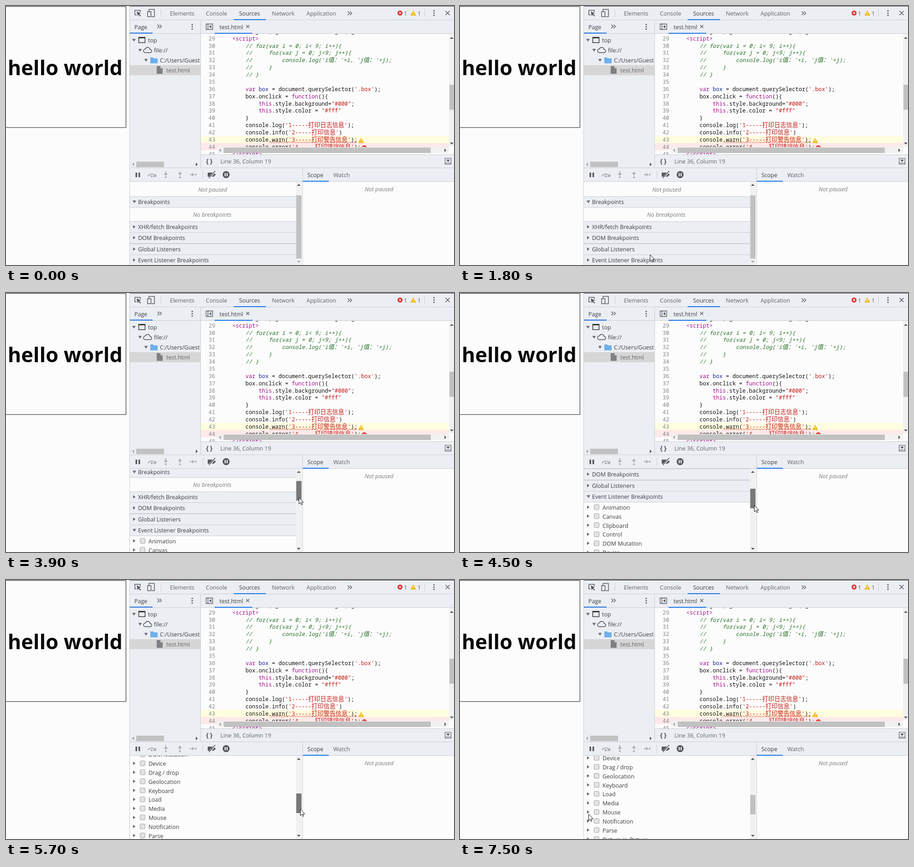
These frames come from a looping animation (984 by 569 pixels, 8000 ms). An HTML page:

```html
<!DOCTYPE html>
<html lang="en">
<head>
<meta charset="utf-8">
<title>Debugger panel</title>
<style>
  html, body { margin: 0; width: 100%; height: 100%; overflow: hidden; background: #fcfcfc; }
  svg { display: block; }
  text { font: 12.5px "Open Sans", "Noto Sans", sans-serif; fill: #3a3d42; white-space: pre; }
  .tab { fill: #5f6368; }
  .note { font-style: italic; fill: #7b7e82; text-anchor: middle; }
  .title { font-size: 45px; font-weight: 700; fill: #0a0a0a; }
  .code { font: 12.1px "Noto Sans Mono", "DejaVu Sans Mono", monospace; fill: #111; }
  .num { fill: #85888c; text-anchor: end; }
  .brace { font-size: 15px; font-weight: 600; fill: #55585c; }
  .cjk { font-family: "Noto Sans CJK SC", "Noto Sans CJK", sans-serif; font-size: 13.2px; }
  .com { fill: #236e25; font-style: italic; }
  .key { fill: #a3128c; }
  .str { fill: #c41a16; }
  .def { fill: #1c2b9c; }
</style>
</head>
<body>
<svg id="stage" width="984" height="569" viewBox="0 0 984 569"></svg>
<script>
const BAR = '#ebeef3', PAGE = '#fcfcfc', EDGE = '#cbcdd1', BLUE = '#1a73e8', ICON = '#55585c', DIM = '#a9abb0';

const esc = s => s.replace(/&/g, '&amp;').replace(/</g, '&lt;');
const rect = (x, y, w, h, fill, more = '') =>
  `<rect x="${x}" y="${y}" width="${w}" height="${h}" fill="${fill}" ${more}/>`;
const path = (d, fill, more = '') => `<path d="${d}" fill="${fill}" ${more}/>`;
const line = (d, color = ICON, w = 1.5) => path(d, 'none', `stroke="${color}" stroke-width="${w}"`);
const dot = (x, y, r, fill) => `<circle cx="${x}" cy="${y}" r="${r}" fill="${fill}"/>`;
const label = (x, cy, s, cls = '') => `<text x="${x}" y="${cy + 4.5}" class="${cls}">${esc(s)}</text>`;
const clip = (id, x, y, w, h) => `<clipPath id="${id}">${rect(x, y, w, h, '#000')}</clipPath>`;

const right = (x, y, c = '#6b6e72') => path(`M${x} ${y - 3.7}l5.5 3.7l-5.5 3.7z`, c);
const down = (x, y, c = '#6b6e72') => path(`M${x - 4} ${y - 2.7}h8l-4 6z`, c);
const cross = (x, y, r, c = ICON, w = 1.5) =>
  line(`M${x - r} ${y - r}l${2 * r} ${2 * r}m0 ${-2 * r}l${-2 * r} ${2 * r}`, c, w);
const kebab = (x, y) => [-5, 0, 5].map(d => dot(x, y + d, 1.6, ICON)).join('');
const more = (x, y) => line(`M${x - 4.5} ${y - 4}l4 4l-4 4m5 -8l4 4l-4 4`, ICON, 1.4);
// Scrollbar arrow: tip direction (dx, dy)
const tip = (x, y, dx, dy, c = '#505050') =>
  path(`M${x + dx * 2} ${y + dy * 2}L${x - dx * 2 - dy * 4} ${y - dy * 2 - dx * 4}L${x - dx * 2 + dy * 4} ${y - dy * 2 + dx * 4}z`, c);
const warn = (x, y) =>
  path(`M${x} ${y - 5}l5.5 10h-11z`, '#f2b70f', 'stroke="#f2b70f" stroke-linejoin="round"') +
  line(`M${x} ${y - 2}v3.6m0 1v1.6`, '#fff', 1.4);
const error = (x, y) => dot(x, y, 5.5, '#e0342d') + cross(x, y, 2, '#fff', 1.3);

// ---- Page under test
const page = () =>
  rect(0, 0, 984, 569, PAGE) +
  line('M0 1H263.5V267H0', '#111', 1) +
  `<text class="title" x="3.7" y="152">hello world</text>`;

// ---- Main toolbar
const toolbar = () => {
  const tabs = [[360, 'Elements'], [439, 'Console'], [512, 'Sources'], [584, 'Network'], [660, 'Application']];
  return rect(271, 0, 713, 30, BAR) + rect(271, 0, 713, 1, '#3c3c3c') + rect(271, 30, 713, 1, EDGE) +
    line('M287 19.5h-4v-10h12v4') + path('M287 12l9.5 4l-4 1.5l4 4l-1.5 1.5l-4 -4l-1.5 3.5z', ICON) +
    line('M314 12V7.5h12v16h-6M311 12.5h7.5v11h-7.5z') +
    rect(340, 7, 1, 17, EDGE) +
    tabs.map(([x, s]) => label(x, 16, s, s === 'Sources' ? '' : 'tab')).join('') +
    rect(500, 29, 71, 2, BLUE) + more(755, 16) +
    error(865.5, 15.5) + label(874, 16, '1', 'tab') + warn(894.5, 15.5) + label(904, 16, '1', 'tab') +
    rect(919, 7, 1, 17, EDGE) + kebab(940, 15.5) + cross(970, 15.5, 4.5);
};

// ---- File tree
const tree = () =>
  rect(271, 31, 156, 324, BAR) + rect(271, 60, 156, 1, EDGE) +
  label(282, 46, 'Page') + rect(271, 58.5, 51, 2, BLUE) + more(337, 45) + kebab(409, 45.5) +
  rect(271, 130, 156, 22, '#d6d6d6') +
  down(281, 75) + line('M291.5 69h14v11.5h-14z', '#333') + rect(291, 68, 15, 3, '#333') + label(312, 75, 'top') +
  down(294.5, 97) +
  line('M306 102.5h10.5a3.5 3.5 0 0 0 0 -7a5.5 5.5 0 0 0 -10.5 -1a4 4 0 0 0 0 8z', '#44474b') +
  label(325, 97, 'file://') +
  down(307.5, 119) + path('M317 113h6l2 2h8v11h-16z', '#6db0ee') +
  `<g clip-path="url(#nav)">${label(338, 119, 'C:/Users/Guest')}</g>` +
  path('M331 132h8l5 5v12h-13z', '#7f8083') + path('M339 132v5h5z', '#c9cacc') +
  label(352, 141, 'test.html', 'tab') +
  rect(286, 342, 61, 12, '#c1c1c1') + tip(279, 348, -1, 0, '#a0a0a0') + tip(419, 348, 1, 0) +
  rect(427, 31, 1, 324, EDGE);

// ---- Code editor
const PITCH = 15.87, CELL = 7.26, FIRST = 29;
const source = [
  '    <script>',
  '        // for(var i = 0; i< 9; i++){',
  '        //     for(var j = 0; j<9; j++){',
  "        //         console.log('i值：'+i, 'j值：'+j);",
  '        //     }',
  '        // }',
  '',
  "        var box = document.querySelector('.box');",
  '        box.onclick = function(){',
  '            this.style.background="#000";',
  '            this.style.color = "#fff"',
  '        }',
  "        console.log('1-----打印日志信息');",
  "        console.info('2-----打印信息')",
  "        console.warn('3-----打印警告信息');",
  "        console.error('4-----打印错误信息');",
  '    <\/script>'
];
const span = (cls, s) => `<tspan class="${cls}">${s}</tspan>`;
const wide = s => esc(s).replace(/[\u3000-\uffef]+/g, m => span('cjk', m));
const tint = s => {
  if (s.startsWith('//')) return span('com', wide(s));
  return s.split(/('[^']*'|"[^"]*"|\bvar\b|\bthis\b|\bfunction\b|<\/?script>|box(?= =))/).map((part, i) => {
    if (i % 2 === 0) return wide(part);
    const cls = /^['"]/.test(part) ? 'str' : part === 'box' ? 'def' : 'key';
    return span(cls, wide(part));
  }).join('');
};
const codeLine = (s, i) => {
  const y = 75.7 + i * PITCH, indent = s.search(/\S|$/);
  return `<text class="code num" x="459.5" y="${y}">${FIRST + i}</text>` +
    `<text class="code" x="${467.9 + indent * CELL}" y="${y}">${tint(s.trim())}</text>`;
};
const wave = (x, y, n) => line(`M${x} ${y}` + 'q1.5 -3 3 0t3 0'.repeat(n), '#d8372f', 1);

const editor = () =>
  rect(428, 31, 556, 29, BAR) + rect(428, 60, 556, 1, EDGE) +
  line('M439.5 39.5h14.5v12h-14.5zM443.5 39.5v12', ICON, 1.3) + path('M451 42v7l-5 -3.5z', ICON) +
  label(469, 46, 'test.html') + cross(531, 45, 3.3, ICON, 1.3) + rect(458, 59, 83, 2, BLUE) +
  `<g clip-path="url(#code)">` +
    rect(428, 285, 545, 16, '#fffde0') + rect(428, 301, 545, 16, '#fde9e9') +
    `<text class="code" x="526" y="59.8">   g   , g                 g  , g</text>` +
    source.map(codeLine).join('') +
    wave(578, 299.5, 32) + warn(780, 295.5) + error(787, 311.5) +
  `</g>` +
  rect(464, 310, 509, 13, '#f1f1f1') + rect(478, 311, 455, 12, '#c1c1c1') +
  tip(470, 317, -1, 0, '#a0a0a0') + tip(965, 317, 1, 0) +
  rect(973, 61, 11, 247, '#f1f1f1') + rect(974, 173, 10, 55, '#c1c1c1') +
  tip(979, 70, 0, -1) + tip(979, 302, 0, 1) +
  rect(428, 326, 556, 29, BAR) + rect(428, 326, 556, 1, EDGE) +
  `<text class="code brace" x="437.5" y="345.5">{}</text>` +
  label(471, 341, 'Line 36, Column 19', 'tab') +
  line('M964.5 334.5h13v13h-13zM964 345h14', ICON, 1.1) + path('M967 337.5h8l-4 5z', ICON);

// ---- Debugger bar and scope
const debugBar = () =>
  rect(271, 355, 713, 31, BAR) + rect(271, 355, 713, 1, EDGE) + rect(271, 385, 713, 1, EDGE) +
  rect(284.5, 366, 3.5, 10, ICON) + rect(291, 366, 3.5, 10, ICON) +
  line('M312 374a8.5 7 0 0 1 15.5 -1', DIM, 2) + path('M330 368v7.5h-7.5z', DIM) + dot(320, 374, 2.2, DIM) +
  line('M351 363v6', DIM, 2) + path('M346.5 368h9l-4.5 5z', DIM) + dot(351, 376, 2, DIM) +
  line('M382 373v-6', DIM, 2) + path('M377.5 369h9l-4.5 -5z', DIM) + dot(382, 376.5, 2, DIM) +
  line('M404 370.5h7', DIM, 2) + path('M409 366.5v8l4.5 -4z', DIM) + dot(416.5, 370.5, 2, DIM) +
  rect(432, 362, 1, 18, EDGE) +
  path('M443 366h13l5 4.5l-5 4.5h-13z', ICON) + line('M446 378.5l14 -16', BAR, 4) + line('M445.5 378l14 -15.5', ICON, 1.8) +
  dot(483.5, 370.5, 7.7, ICON) + rect(480.3, 367, 2.2, 7, '#fff') + rect(484.6, 367, 2.2, 7, '#fff') +
  label(662, 371, 'Scope') + label(719, 371, 'Watch', 'tab') + rect(652, 384, 57, 2, BLUE) +
  label(819.5, 402, 'Not paused', 'note') + rect(651, 356, 1, 213, EDGE);

// ---- Breakpoint sections: top edge in the unscrolled list, title
const sections = [[418, 'Breakpoints'], [473, 'XHR/fetch Breakpoints'], [497, 'DOM Breakpoints'],
  [522, 'Global Listeners'], [546, 'Event Listener Breakpoints']];
const events = ['Animation', 'Canvas', 'Clipboard', 'Control', 'DOM Mutation', 'Device', 'Drag / drop',
  'Geolocation', 'Keyboard', 'Load', 'Media', 'Mouse', 'Notification', 'Parse', 'Picture-in-Picture'];

const section = ([top, s], i) => {
  const y = top + 12;
  const mark = i === 0 ? down(282, y) : i < 4 ? right(279, y) :
    `<g id="shut">${right(279, y)}</g><g id="open">${down(282, y)}</g>`;
  return rect(271, top, 366, 24, BAR) + rect(271, top, 366, 1, EDGE) + rect(271, top + 24, 366, 1, EDGE) +
    mark + label(290, y, s);
};
const eventRow = (s, i) => {
  const y = 582.5 + i * 19.83;
  return right(279, y - 1) +
    rect(294.5, y - 6.5, 11, 11, '#e3e3e3', 'rx="2" stroke="#a2a2a2"') + label(313, y, s);
};

const sidebar = () =>
  `<g clip-path="url(#list)"><g id="scroll">` +
    label(454, 403, 'Not paused', 'note') + label(453, 458.5, 'No breakpoints', 'note') +
    sections.map(section).join('') + `<g id="events">${events.map(eventRow).join('')}</g>` +
  `</g></g>` +
  rect(637, 386, 13, 183, '#f1f1f1') + tip(643, 393, 0, -1) +
  `<g id="end">${tip(643, 562, 0, 1)}</g>` + rect(637.5, 416, 11.5, 139, '#c1c1c1', 'id="thumb"') +
  rect(271, 0, 1, 569, EDGE);

const pointers = () => {
  const outline = 'stroke="#111" stroke-width="1"';
  return `<g id="arrow">${path('M.5 .5V14.5L3.8 11.5L6 16.5L8 15.6L5.9 10.8H10.3z', '#fff', outline)}</g>` +
    `<g id="resize">${path('M-10.5 0l5 -4.5v3h4v-3h3v3h4v-3l5 4.5l-5 4.5v-3h-4v3h-3v-3h-4v3z', '#fff', outline)}</g>`;
};

const $ = id => document.getElementById(id);
$('stage').innerHTML = '<defs>' + clip('nav', 271, 61, 156, 281) + clip('code', 428, 61, 545, 265) +
  clip('list', 271, 386, 366, 183) + '</defs>' +
  page() + tree() + editor() + toolbar() + debugBar() + sidebar() + pointers();

// ---- Motion: [first step, last step, pointer x, pointer y, scroll]
const STEP = 100, LOOP = 8000, OPEN = 2600;
const moves = [
  [300, 300, 901, 133, 0], [400, 400, 768, 306, 0], [500, 500, 751, 344, 0],
  [700, 900, 649, 434, 0], [1000, 1000, 612, 538, 0], [1100, 1100, 583, 504, 0],
  [1300, 1500, 443, 540, 0], [1700, 2200, 364, 557, 0], [2400, 2400, 363, 556, 0],
  [OPEN, OPEN, 363, 556, 37], [2800, 3000, 591, 489, 37], [3200, 3700, 643, 449, 37],
  [4200, 4500, 646, 466, 111], [4600, 5200, 646, 490, 217], [5300, 5700, 646, 503, 278],
  [5800, 5900, 647, 505, 289.5], [6400, 6400, 500, 514, 289.5], [6500, 6500, 374, 509, 289.5],
  [6700, 6800, 304, 509, 289.5], [7000, 7300, 283, 514, 289.5], [7500, 7500, 282, 514, 289.5]
];

const poseAt = t => {
  let pose = moves[0].slice(2);
  for (const [from, to, ...goal] of moves) {
    if (t < from) break;
    const k = Math.min(1, (t - from + STEP) / (to - from + STEP));
    pose = pose.map((v, i) => v + (goal[i] - v) * k);
  }
  return pose.map(Math.round);
};

const show = (id, on) => $(id).setAttribute('visibility', on ? 'visible' : 'hidden');
const shift = (id, x, y) => $(id).setAttribute('transform', `translate(${x} ${y})`);

function draw(time) {
  const t = Math.floor(time % LOOP / STEP) * STEP;
  const [x, y, scroll] = poseAt(t);
  const open = t >= OPEN, resizing = t === 900, thumb = $('thumb');
  shift('arrow', x, y);
  shift('resize', x, y);
  show('arrow', t >= 300 && !resizing);
  show('resize', resizing);
  shift('scroll', 0, -scroll);
  show('shut', !open);
  show('open', open);
  show('events', open);
  $('end').setAttribute('opacity', open ? 1 : 0.5);
  thumb.setAttribute('y', open ? Math.round(404.5 + scroll / 4.32) : 416);
  thumb.setAttribute('height', open ? 43 : 139);
  thumb.setAttribute('fill', t >= 3900 && t < 6200 ? '#787878' : t >= 3700 && t < 3900 ? '#a8a8a8' : '#c1c1c1');
}

const start = performance.now();
function tick() {
  draw(performance.now() - start);
  requestAnimationFrame(tick);
}
tick();
</script>
</body>
</html>
```
